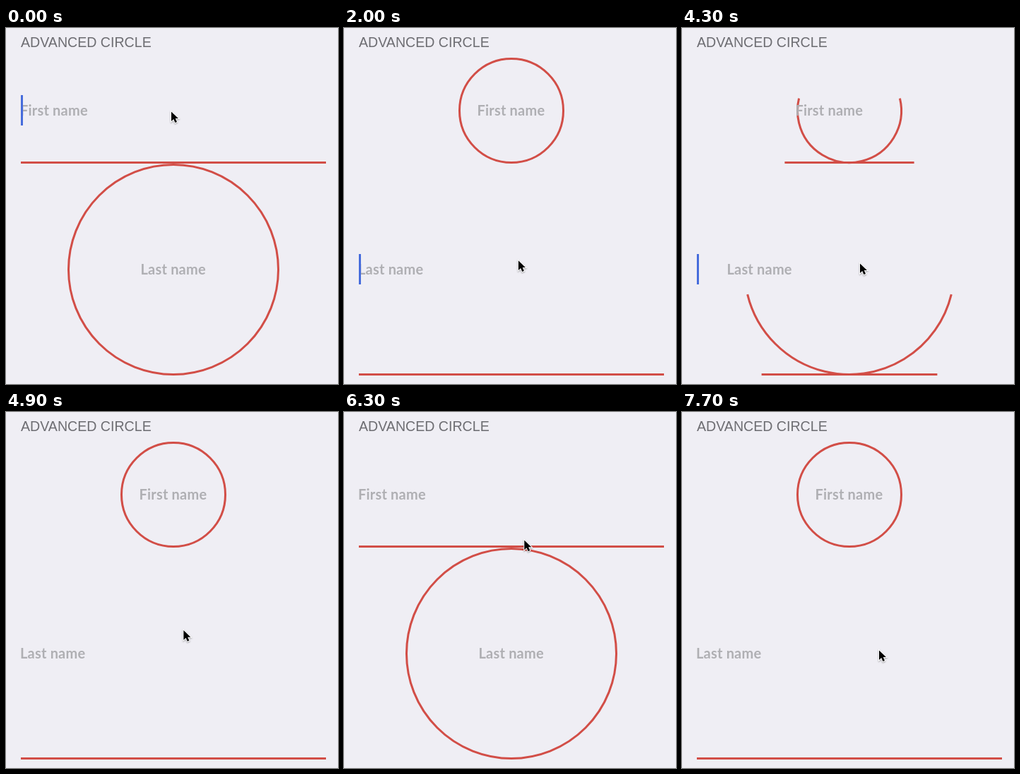
Animation of 470x504 px, one loop 8000 ms. Source, as an HTML page with a canvas:

```html
<!DOCTYPE html>
<html lang="en">
<head>
<meta charset="utf-8">
<title>Advanced circle</title>
<style>
  html, body { margin: 0; height: 100%; overflow: hidden; background: #efeef4; }
  canvas { display: block; }
</style>
</head>
<body>
<canvas id="stage" width="470" height="504"></canvas>
<script>
const ctx = document.getElementById('stage').getContext('2d');
const LOOP = 8000, STEP = 100, LAST_CHANGE = 7700, MORPH = 300;
const LEFT = 21, WIDTH = 432, MID = LEFT + WIDTH / 2;

// Focus moves to the other field at each of these times; even entries focus the first field.
const focusTimes = [-500, 1460, 2905, 4200, 5474, 6982];
const fields = [
  { label: 'First name', y: 117, r: 73.5, centredX: 188.5 },
  { label: 'Last name', y: 342, r: 148.5, centredX: 190.5 }
];

// Pointer stops: time, x, y
const pointerStops = [
  [0, 234, 118.5], [900, 246, 315], [1200, 247, 337], [1950, 247, 337],
  [2450, 243, 64], [2700, 240, 126], [3200, 240, 126], [3850, 252, 333.5],
  [4750, 252, 333.5], [5450, 247, 127], [6050, 247, 127], [6800, 279, 337.5]
];
const arrow = new Path2D('M0 0V13.6L3.2 10.6L5.4 15.6L8 14.5L5.8 9.6H10Z');

const clamp = v => Math.max(0, Math.min(1, v));
const smooth = v => v * v * (3 - 2 * v);

// cubic-bezier(.25, .1, .25, 1)
function ease(x) {
  if (x >= 1) return 1;
  let lo = 0, hi = 1;
  for (let i = 0; i < 20; i++) {
    const s = (lo + hi) / 2;
    if (0.75 * s * (1 - s) + s ** 3 < x) lo = s; else hi = s;
  }
  return 0.3 * lo * (1 - lo) ** 2 + 3 * lo * lo * (1 - lo) + lo ** 3;
}

// Critically damped spring
const spring = x => 1 - (1 + x) * Math.exp(-x);

// Solid, fade out, hidden, fade in, once a second
function caretAlpha(age) {
  const a = age % 1000;
  return a < 900 ? 1 - clamp((a - 560) / 140) : (a - 900) / 100;
}

function drawField({ label, y, r, centredX }, focused, age) {
  const p = ease(clamp(age / MORPH));
  const line = focused ? p : 1 - p;
  const arc = (1 - line) * Math.PI;

  ctx.strokeStyle = '#d24e47';
  ctx.lineWidth = 3;
  if (line > 0) {
    ctx.beginPath();
    ctx.moveTo(MID - WIDTH / 2 * line, y + r);
    ctx.lineTo(MID + WIDTH / 2 * line, y + r);
    ctx.stroke();
  }
  if (arc > 0) {
    ctx.beginPath();
    ctx.arc(MID, y, r, Math.PI / 2 - arc, Math.PI / 2 + arc);
    ctx.stroke();
  }

  const moved = spring(age / MORPH * (focused ? 8 : 9.7));
  const centred = focused ? 1 - moved : moved;
  ctx.font = '700 20px Lato, sans-serif';
  ctx.letterSpacing = '0.2px';
  ctx.fillStyle = '#afafb3';
  ctx.fillText(label, 20 + (centredX - 20) * centred, y + 7);

  if (focused) {
    ctx.globalAlpha = caretAlpha(age);
    ctx.fillStyle = '#466cdc';
    ctx.fillRect(LEFT, y - 22, 3, 43);
    ctx.globalAlpha = 1;
  }
}

function drawPointer(t) {
  let i = 0;
  while (i < pointerStops.length - 2 && t >= pointerStops[i + 1][0]) i++;
  const [t0, x0, y0] = pointerStops[i], [t1, x1, y1] = pointerStops[i + 1];
  const k = smooth(clamp((t - t0) / (t1 - t0)));
  ctx.save();
  ctx.translate(x0 + (x1 - x0) * k, y0 + (y1 - y0) * k);
  ctx.shadowColor = 'rgba(0, 0, 0, .35)';
  ctx.shadowBlur = 2;
  ctx.shadowOffsetY = 1;
  ctx.strokeStyle = '#fff';
  ctx.lineWidth = 2;
  ctx.stroke(arrow);
  ctx.shadowColor = 'transparent';
  ctx.fillStyle = '#000';
  ctx.fill(arrow);
  ctx.restore();
}

function draw() {
  const now = performance.now() % LOOP;
  const t = Math.min(Math.floor(now / STEP) * STEP, LAST_CHANGE);

  ctx.fillStyle = '#efeef4';
  ctx.fillRect(0, 0, 470, 504);
  ctx.font = '19.6px "Liberation Sans", Arial, sans-serif';
  ctx.letterSpacing = '0px';
  ctx.fillStyle = '#6d6d72';
  ctx.fillText('ADVANCED CIRCLE', LEFT, 27);

  const turn = focusTimes.filter(f => f <= t).length - 1;
  fields.forEach((field, i) => drawField(field, turn % 2 === i, t - focusTimes[turn]));
  drawPointer(t);
  requestAnimationFrame(draw);
}
draw();
</script>
</body>
</html>
```
